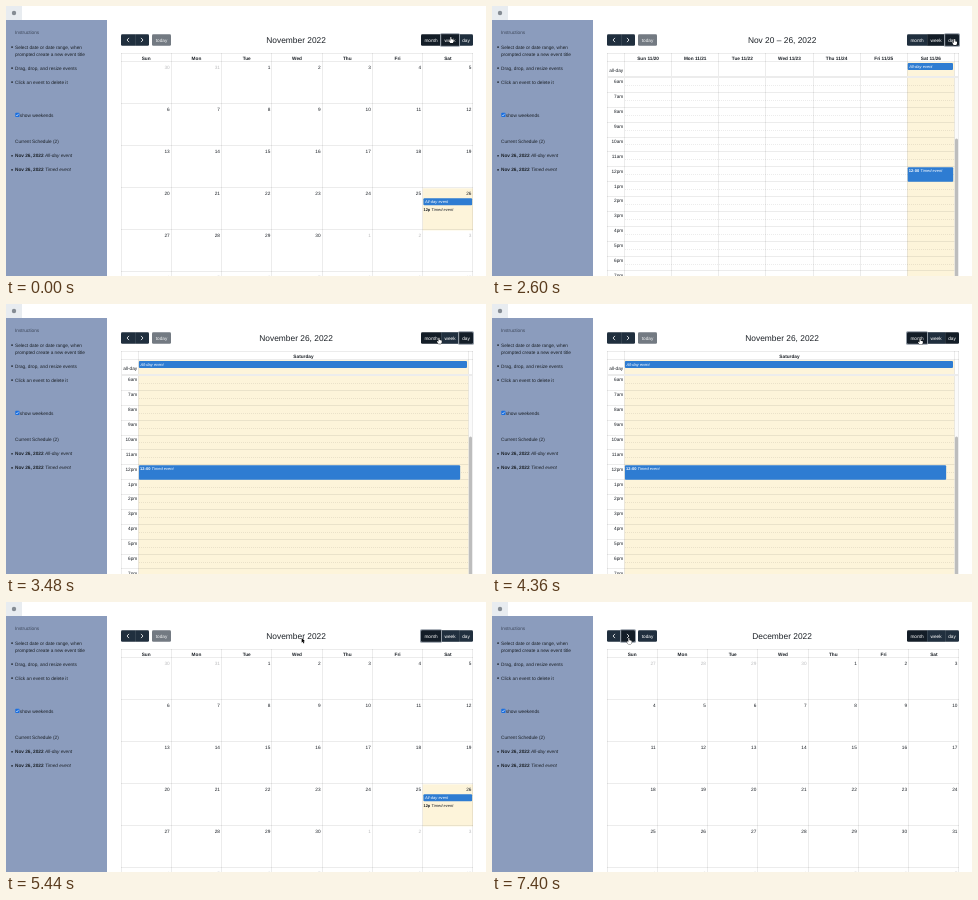
These frames come from a looping animation (480x270 px, 8 s). An HTML page with a canvas:

```html
<!DOCTYPE html>
<html lang="en">
<head>
<meta charset="utf-8">
<title>Event calendar</title>
<style>
html, body { margin: 0; width: 100%; height: 100%; overflow: hidden; background: #fff; }
canvas { display: block; width: 480px; height: 270px; }
</style>
</head>
<body>
<canvas id="stage"></canvas>
<script>
const canvas = document.getElementById('stage');
const ctx = canvas.getContext('2d');
const dpr = window.devicePixelRatio || 1;
canvas.width = 480 * dpr;
canvas.height = 270 * dpr;

const LOOP = 8000;
const FONT = '"Liberation Sans", Arial, sans-serif';
const BASE = 4.73, SMALL = 4.02;
const INK = '#1c2127', LINE = 'rgba(0,0,0,.075)', BLUE = '#2e7cd2', CREAM = '#fdf4da';
const DARK = '#202f3e', DARKER = '#131d27', MUTED = '#737a82';
const LEFT = 115, RIGHT = 467, TOP = 47, BODY = 56;
const AXIS = 132.5, DAY_END = 462.4, HOUR = 14.88, SLOT_TOP = 72;
const DAYS = ['Sun', 'Mon', 'Tue', 'Wed', 'Thu', 'Fri', 'Sat'];

// Start time, view and heading
const VIEWS = [
  [0, 'month', 'November 2022'],
  [920, 'week', 'Nov 20 – 26, 2022'],
  [2760, 'day', 'November 26, 2022'],
  [4400, 'month', 'November 2022'],
  [7200, 'month', 'December 2022']
];
const FOCUS = [[0, 'week'], [1960, 'day'], [4080, 'month'], [6960, 'next']];

// Pointer stops: time, x, y
const PATH = [
  [0, 445, 31], [1240, 445, 31], [1720, 459.5, 33.5], [1760, 459.5, 33.5], [2080, 462.4, 33],
  [3080, 462.4, 33], [3600, 428.6, 34], [3740, 428.6, 34], [3760, 428.2, 34.5],
  [5140, 428.2, 34.5], [5520, 279, 36], [5740, 279, 36], [6080, 169.5, 38],
  [6320, 169.5, 38], [6360, 166, 37.6], [6880, 137, 36], [LOOP, 137, 36]
];

const BUTTONS = [
  ['prev', 115, 129, 'l'], ['next', 129, 143, 'r'], ['today', 146, 165, 'lr'],
  ['month', 415, 435, 'l'], ['week', 435, 453, ''], ['day', 453, 467, 'r']
];
const BTN_TOP = 28.2, BTN_H = 11.6;

const at = (list, t) => list.filter(e => e[0] <= t).pop();

function rect(x, y, w, h, color) {
  ctx.fillStyle = color;
  ctx.fillRect(x, y, w, h);
}
const hLine = (x1, x2, y, color = LINE) => rect(x1, Math.floor(y), x2 - x1, 1, color);
const vLine = (x, y1, y2, color = LINE) => rect(Math.floor(x), y1, 1, y2 - y1, color);

function dotted(x1, x2, y) {
  for (let x = Math.ceil(x1); x < x2; x += 2) rect(x, Math.floor(y), 1, 1, LINE);
}

function round(x, y, w, h, r, color) {
  ctx.fillStyle = color;
  ctx.beginPath();
  ctx.roundRect(x, y, w, h, r);
  ctx.fill();
}

function stroke(points, color, width) {
  ctx.strokeStyle = color;
  ctx.lineWidth = width;
  ctx.beginPath();
  points.forEach(p => ctx.lineTo(...p));
  ctx.stroke();
}

// y is the middle of the letters; returns the x where the text ends
function text(s, x, y, { size = BASE, style = '', align = 'left', color = INK } = {}) {
  ctx.font = `${style} ${size}px ${FONT}`;
  ctx.textAlign = align;
  ctx.fillStyle = color;
  ctx.fillText(s, x, y + size * .35);
  return x + ctx.measureText(s).width;
}

function labelled(bold, italic, x, y, size, color, gap) {
  const end = text(bold, x, y, { size, style: 'bold', color });
  text(italic, end + gap, y, { size, style: 'italic', color });
}

function sidebar() {
  rect(0, 0, 16, 14, '#e8ecf0');
  ctx.fillStyle = '#858c94';
  ctx.beginPath();
  ctx.arc(8, 7, 2.2, 0, 7);
  ctx.fill();
  rect(0, 14, 101, 256, '#8b9cbd');
  const bullet = y => round(5.2, y - .8, 1.7, 1.7, .85, INK);
  text('Instructions', 9, 26.7, { color: '#3d475a' });
  [['Select date or date range, when', 41], ['Drag, drop, and resize events', 62],
   ['Click an event to delete it', 76]].forEach(([s, y]) => { bullet(y); text(s, 9, y); });
  text('prompted create a new event title', 9, 48);

  round(9.3, 106.8, 4.2, 4.2, .7, '#1a6fe0');
  stroke([[10.2, 109], [11, 109.9], [12.6, 107.8]], '#fff', .6);
  text('show weekends', 13.8, 109.3);

  text('Current Schedule (2)', 9, 135.3);
  [['All-day event', 149.7], ['Timed event', 163.8]].forEach(([s, y]) => {
    bullet(y);
    labelled('Nov 26, 2022', s, 9, y, BASE, INK, 1.3);
  });
}

function toolbar(view, title, focus, hover) {
  text(title, 290.1, 34, { size: 8.4, align: 'center' });
  const off = title.startsWith('Dec') ? '' : 'today';
  const draw = ([id, x1, x2, ends]) => {
    const l = ends.includes('l') ? 1.3 : 0, r = ends.includes('r') ? 1.3 : 0;
    if (id === focus) round(x1 - 1, BTN_TOP - 1, x2 - x1 + 2, BTN_H + 2, 1.6, '#929ba5');
    const lit = id === view || id === focus || id === hover;
    round(x1, BTN_TOP, x2 - x1, BTN_H, [l, r, r, l], id === off ? MUTED : lit ? DARKER : DARK);
    if (!l) vLine(x1, BTN_TOP, BTN_TOP + BTN_H, 'rgba(255,255,255,.1)');
    const cx = (x1 + x2) / 2, dir = { prev: -1, next: 1 }[id];
    if (dir) stroke([[cx - dir, 31.9], [cx + dir, 34], [cx - dir, 36.1]], '#fff', .8);
    else text(id, cx, 34, { align: 'center', color: id === off ? '#f1f2f3' : '#fff' });
  };
  BUTTONS.filter(b => b[0] !== focus).forEach(draw);
  BUTTONS.filter(b => b[0] === focus).forEach(draw);
}

function frame() {
  hLine(LEFT, RIGHT, TOP);
  hLine(LEFT, RIGHT, BODY - 1);
  vLine(LEFT, TOP, 270);
  vLine(RIGHT - 1, TOP, 270);
}

function monthView(title) {
  const w = (RIGHT - LEFT) / 7, h = 42.1;
  const month = title.startsWith('Dec') ? 11 : 10;
  const lead = new Date(2022, month, 1).getDay();
  if (month === 10) rect(LEFT + 6 * w, BODY + 3 * h, w, h, CREAM);
  frame();
  DAYS.forEach((d, i) => {
    text(d, LEFT + (i + .5) * w, 52, { style: 'bold', align: 'center' });
    if (i) vLine(LEFT + i * w, TOP, 270);
  });
  for (let i = 0; i < 42; i++) {
    const col = i % 7, row = Math.floor(i / 7);
    const date = new Date(2022, month, i - lead + 1);
    if (!col && row) hLine(LEFT, RIGHT, BODY + row * h - 1);
    text(date.getDate(), LEFT + (col + 1) * w - 1.6, BODY + row * h + 5,
      { align: 'right', color: date.getMonth() === month ? INK : '#bcbdbf' });
  }
  if (month === 10) {
    round(417.4, 192.2, 48.7, 7, 1, BLUE);
    text('All-day event', 419, 196, { size: SMALL, style: 'italic', color: '#fff' });
    labelled('12p', 'Timed event', 417.4, 203.4, SMALL, INK, 1);
  }
}

function timeView(view) {
  const week = view === 'week', n = week ? 7 : 1, w = (DAY_END - AXIS) / n;
  const x = DAY_END - w;
  rect(x, BODY, w, 14, CREAM);
  rect(x, SLOT_TOP, w, 200, CREAM);
  frame();
  for (let i = 0; i < n; i++) {
    const label = week ? `${DAYS[i]} 11/${20 + i}` : 'Saturday';
    text(label, AXIS + (i + .5) * w, 52, { style: 'bold', align: 'center' });
    vLine(AXIS + i * w, TOP, 270);
  }
  vLine(DAY_END, TOP, 270);
  text('all-day', 131.2, 64, { align: 'right' });
  rect(LEFT, 70, RIGHT - LEFT, 2, '#ececec');

  for (let i = 0; i < 14; i++) {
    const y = SLOT_TOP + i * HOUR, hour = 6 + i;
    if (i) hLine(LEFT, DAY_END, y - .5);
    dotted(AXIS, DAY_END, y + HOUR / 2);
    text(`${(hour + 11) % 12 + 1}${hour < 12 ? 'am' : 'pm'}`, 131.2, y + 3.8, { align: 'right' });
  }

  round(x + .4, 57, w - 1.8, 7, 1, BLUE);
  text('All-day event', x + 2, 60.6, { size: SMALL, style: 'italic', color: '#fff' });
  round(x + .4, SLOT_TOP + 6 * HOUR, w * .975 - .4, HOUR - .4, 1, BLUE);
  labelled('12:00', 'Timed event', x + 1.6, 164.8, SMALL, '#fff', 1.2);

  rect(463, SLOT_TOP, 3, 198, '#fafafa');
  round(463, 132.5, 3, 145, 1.5, '#bdbdbd');
}

function pointer(t) {
  const i = PATH.findIndex(p => p[0] > t);
  const [t0, x0, y0] = PATH[i - 1], [t1, x1, y1] = PATH[i];
  const k = (t - t0) / (t1 - t0), e = k * k * (3 - 2 * k);
  return [x0 + (x1 - x0) * e, y0 + (y1 - y0) * e];
}

function drawPointer(x, y, hand) {
  const shape = hand
    ? [[-.6, 0], [.3, 0], [.4, 2.2], [2.6, 2.7], [2.7, 4.3], [1.9, 6], [-.8, 6], [-2.3, 3.6], [-1.7, 3.2], [-.7, 4]]
    : [[0, 0], [0, 4.8], [1.1, 3.8], [1.9, 5.6], [2.7, 5.2], [1.9, 3.5], [3.4, 3.4]];
  ctx.beginPath();
  shape.forEach(([dx, dy]) => ctx.lineTo(x + dx, y + dy));
  ctx.closePath();
  ctx.lineWidth = hand ? .6 : .8;
  ctx.strokeStyle = hand ? '#000' : '#fff';
  ctx.stroke();
  ctx.fillStyle = hand ? '#fff' : '#000';
  ctx.fill();
}

function render(t) {
  ctx.setTransform(dpr, 0, 0, dpr, 0, 0);
  ctx.textRendering = 'geometricPrecision';
  rect(0, 0, 480, 270, '#fff');
  const [, view, title] = at(VIEWS, t);
  const [x, y] = pointer(t);
  const over = BUTTONS.find(b => x >= b[1] && x < b[2] && y >= BTN_TOP && y < BTN_TOP + BTN_H);
  const hover = over ? over[0] : '';
  sidebar();
  if (view === 'month') monthView(title);
  else timeView(view);
  toolbar(view, title, at(FOCUS, t)[1], hover);
  drawPointer(x, y, hover && hover !== 'today');
}

const start = performance.now();
function tick() {
  render((performance.now() - start) % LOOP);
  requestAnimationFrame(tick);
}
tick();
</script>
</body>
</html>
```
